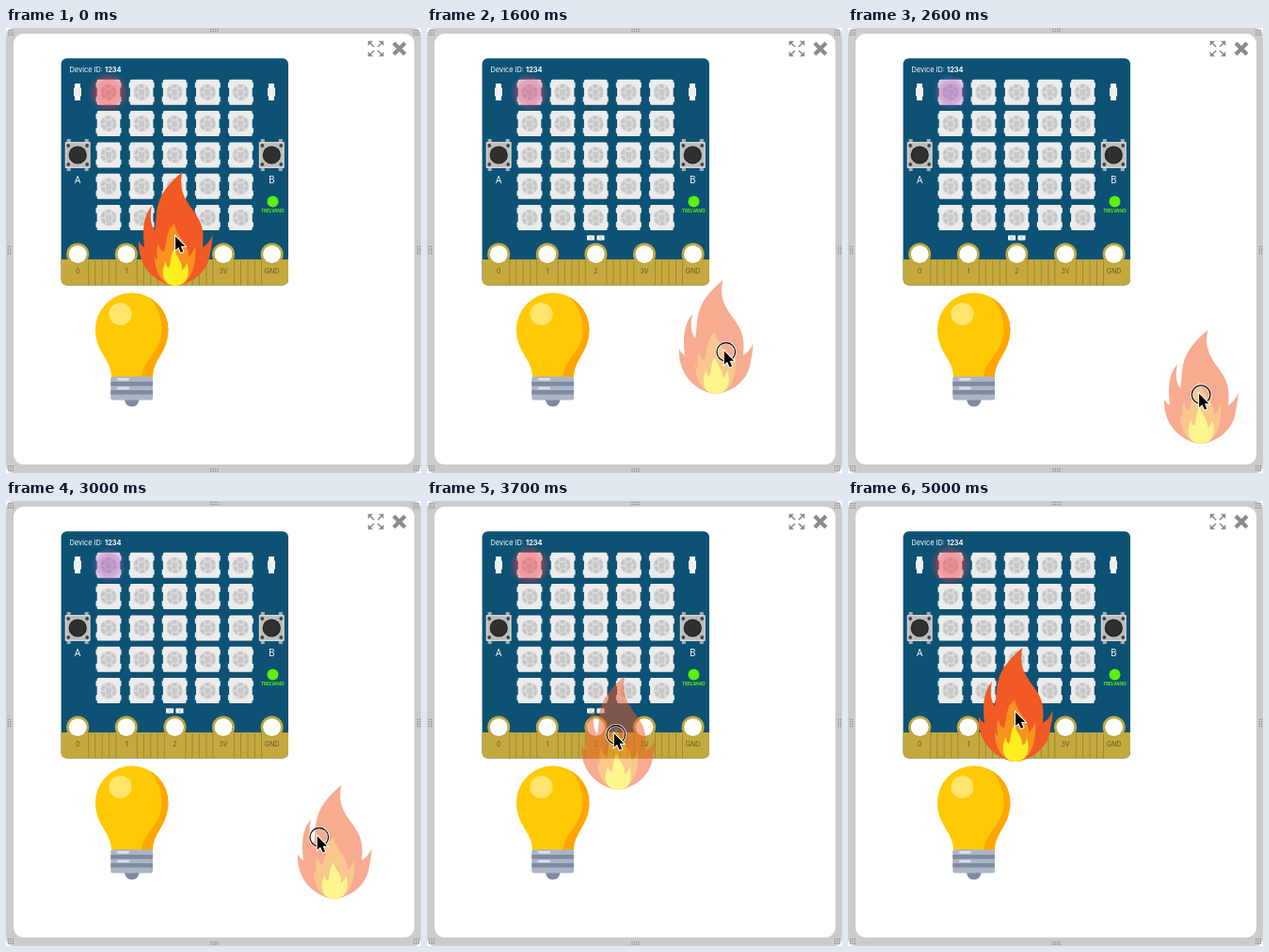
An HTML page with a canvas for the animation above (5500 ms loop, 441 px wide and 473 px high).

```html
<!DOCTYPE html>
<html lang="en">
<head>
<meta charset="utf-8">
<title>Board simulator</title>
<style>
  html, body { margin: 0; width: 100%; height: 100%; overflow: hidden; background: #fff; }
  canvas { display: block; }
</style>
</head>
<body>
<canvas id="stage" width="441" height="473"></canvas>
<script>
const W = 441, H = 473, LOOP = 5500, STEP = 100;
const PRESS = 600, RELEASE = 4800, LAG = 100;
const SANS = '"Open Sans", "Noto Sans", sans-serif', ROUND = 'Inter, Roboto, sans-serif';
const GOLD = '#c4a93e', BOARD = '#0d5274', GREEN = '#5cf00a';

// Pointer drag path: time, x offset, y offset
const PATH = [
  [500, 0, 0], [700, 5, 9], [800, 16, 23], [900, 30, 39], [1000, 44, 51],
  [1500, 127, 115], [1600, 137, 122], [2000, 179, 154], [2100, 187, 161],
  [2400, 195, 168], [2700, 194, 167], [2800, 186, 161], [2900, 169, 149],
  [3000, 152, 135], [3300, 82, 84], [3500, 38, 46], [3600, 23, 33],
  [3700, 20, 26], [4000, 6, 11], [4300, 0, 5], [4600, -2, 3]
];

const stage = document.getElementById('stage').getContext('2d');

function layer(w, h, draw) {
  const c = document.createElement('canvas');
  c.width = w;
  c.height = h;
  draw(c.getContext('2d'));
  return c;
}

function rect(g, x, y, w, h, color, r = 0) {
  g.fillStyle = color;
  g.beginPath();
  g.roundRect(x, y, w, h, r);
  g.fill();
}

function disc(g, x, y, r, color) {
  g.fillStyle = color;
  g.beginPath();
  g.arc(x, y, r, 0, Math.PI * 2);
  g.fill();
}

function shape(g, d, color) {
  g.fillStyle = color;
  g.fill(new Path2D(d));
}

function label(g, text, x, y, font, color, align = 'center') {
  g.font = font;
  g.fillStyle = color;
  g.textAlign = align;
  g.fillText(text, x, y);
}

function drawGrip(g, x, y, cols, rows) {
  for (let i = 0; i < cols; i++)
    for (let j = 0; j < rows; j++)
      rect(g, x + (i - (cols - 1) / 2) * 2.4 - .6, y + (j - (rows - 1) / 2) * 2.4 - .6, 1.2, 1.2, '#888');
}

function drawWindow(g) {
  rect(g, 0, 0, W, H, '#fff');
  rect(g, 0, 0, W, H, '#ccc', 8);
  rect(g, 8, 6, 426, 458, '#fff', 11);
  for (const y of [2.5, 470]) drawGrip(g, 221.5, y, 4, 2);
  for (const x of [3.5, 438.5]) drawGrip(g, x, 236, 2, 4);
  for (const x of [5, 436]) for (const y of [5, 468]) drawGrip(g, x, y, 3, 3);

  g.strokeStyle = g.fillStyle = '#8b8b8b';
  for (const sx of [-1, 1]) for (const sy of [-1, 1]) {
    g.save();
    g.translate(393, 22);
    g.scale(sx, sy);
    g.lineWidth = 1.6;
    g.stroke(new Path2D('M2,2 L7,7'));
    g.fill(new Path2D('M8.3,8.3 H2.8 L4.4,6.8 L6.8,4.4 L8.3,2.8 Z'));
    g.restore();
  }
  g.lineWidth = 4.2;
  g.stroke(new Path2D('M412,16 L424,28 M424,16 L412,28'));
}

function drawLed(g, x, y) {
  g.save();
  g.translate(x, y);
  for (const top of [-10.5, 4.5]) rect(g, -13.5, top, 27, 6, '#ececec', 1);
  rect(g, -12.3, -13.5, 24.6, 27, '#ececec', 1.5);
  disc(g, 0, 0, 9, '#dedede');
  g.strokeStyle = '#c6c6c6';
  g.lineWidth = 3.4;
  g.setLineDash([5, 1.8]);
  g.beginPath();
  g.arc(0, 0, 6.5, 0, Math.PI * 2);
  g.stroke();
  shape(g, 'M-3,-3 H3 V1 L2,4 H-2 L-3,1 Z', '#c9c9c9');
  g.restore();
}

function drawButton(g, x, name) {
  for (const dx of [-11.5, 7.5]) rect(g, x + dx, 118, 4, 34, '#a9adb0');
  rect(g, x - 13.5, 121, 27, 28, '#d2d2d2', 1);
  rect(g, x - 12, 122.5, 24, 25, '#bcbcbc', 1);
  for (const sx of [-10, 10]) for (const sy of [-10, 10])
    disc(g, x + sx, 135 + sy, 1.9, '#444');
  disc(g, x, 135, 9.6, '#222');
  disc(g, x, 135, 8.5, '#303030');
  label(g, name, x, 164.5, '10px ' + SANS, '#fff');
}

function drawBoard(g) {
  g.save();
  g.beginPath();
  g.roundRect(58.6, 32.2, 241.4, 241.2, 6);
  g.clip();
  rect(g, 58, 32, 243, 242, BOARD);
  rect(g, 58, 246, 243, 28, GOLD);
  for (let i = 0; i < 4; i++)
    for (const dx of [11, 18, 25.5, 33, 40])
      rect(g, 76.2 + i * 51.6 + dx, 247, 1, 27, '#a48b2b');
  g.restore();

  ['0', '1', '2', '3V', 'GND'].forEach((name, i) => {
    const x = 76.2 + i * 51.6;
    disc(g, x, 240.5, 12, GOLD);
    disc(g, x, 240.5, 10, '#a8912f');
    disc(g, x, 240.5, 9.5, '#fff');
    label(g, name, x, 261.3, '7px ' + ROUND, '#65581f');
  });

  label(g, 'Device ID:', 67.5, 47, '7.4px ' + ROUND, '#fff', 'left');
  label(g, '1234', 105, 47, 'bold 7.4px ' + ROUND, '#fff', 'left');

  for (let row = 0; row < 5; row++)
    for (let col = 0; col < 5; col++)
      drawLed(g, 109 + col * 35.1, 68.3 + row * 33.3);

  for (const x of [76, 282]) {
    rect(g, x - 3, 59, 6, 18, '#fff');
    rect(g, x - 4, 63.5, 8, 9, '#eceff0');
  }
  for (const x of [170, 180.5]) {
    rect(g, x, 220.5, 8, 5, '#fff');
    rect(g, x + 2.5, 220.5, 3, 5, '#d5dade');
  }
  drawButton(g, 76.2, 'A');
  drawButton(g, 282.3, 'B');

  disc(g, 283.5, 184.5, 6, GREEN);
  label(g, 'TRELVANO', 283.5, 196, 'bold 4.7px ' + SANS, GREEN);
}

function drawBulb(g) {
  const glass = new Path2D('M112,371 C112,352 95,345 95,320.3 A38.7,38.7 0 0 1 172.4,320.3 C172.4,345 156,352 156,371 Z');
  g.fillStyle = '#ffc906';
  g.fill(glass);
  g.save();
  g.clip(glass);
  shape(g, 'M143,279 C158,288 165.5,304 165.5,320 C165.5,345 145,352 144,372 H180 V279 Z', '#ffa700');
  g.restore();
  disc(g, 121.5, 304, 12, '#ffe46d');

  shape(g, 'M126,394 H141.5 C141.5,399 138,402.5 133.7,402.5 C129.5,402.5 126,399 126,394 Z', '#7f8a9f');
  rect(g, 111.3, 370.5, 44.7, 25, '#acb4c6', 2);
  rect(g, 111.3, 376, 44.7, 4.5, '#7f8ba2');
  rect(g, 111.3, 385, 44.7, 4.5, '#7f8ba2');
  for (const y of [372, 381.5]) rect(g, 118, y, 13, 2.8, '#dce1e9', 1.4);
}

function drawFlame(g) {
  g.translate(2, 2);
  shape(g, 'M46.5,0 C38,7 24,19 20,37 C18,45 19,53 17,62 C12,55 12,46 14,36 C4,48 4,63 6,80 C3,78 1,76 0,73 C-1,94 9,109 25,117 C31,120 36,121 41,121 C57,118 74,106 76,86 C77.5,79 78.5,73 78.5,66 C77,72 74,76 68,80 C70,62 67,53 58,41 C49,29 42,18 46.5,0 Z', '#f15a24');
  shape(g, 'M38,55 C29,62 30,74 27,85 C22,83 22,80 21,76 C18,83 20,89 20,94 C18,92 18,91 17,89 C17,107 25,120 39,121 C53,120 62,105 60,78 C59,83 57,87 53,90 C54,76 41,71 38,55 Z', '#f7931e');
  shape(g, 'M38,82 C33,88 35,96 32,102 C29,100 29,98 29,95 C25,102 24,112 30,118 C36,123 45,121 49,117 C53,112 54,104 51,96 C50,101 49,102 46,104 C47,95 40,91 38,82 Z', '#fcee21');
}

const scene = layer(W, H, g => {
  drawWindow(g);
  drawBoard(g);
  drawBulb(g);
});
const flame = layer(84, 126, drawFlame);

function pointAt(t) {
  if (t <= PATH[0][0]) return [0, 0];
  for (let i = 1; i < PATH.length; i++) {
    const [t0, x0, y0] = PATH[i - 1], [t1, x1, y1] = PATH[i];
    if (t <= t1) {
      const k = (t - t0) / (t1 - t0);
      return [x0 + (x1 - x0) * k, y0 + (y1 - y0) * k];
    }
  }
  return PATH[PATH.length - 1].slice(1);
}

// The LED glow turns from red to purple as the flame moves away.
function drawGlow(g, distance) {
  const k = Math.min(1, Math.max(0, (distance - 70) / 150)) ** 2;
  const rgb = [250 - 80 * k, 58 + 25 * k, 68 + 122 * k].map(Math.round).join();
  const r = 22 - 3 * k;
  const fade = g.createRadialGradient(109, 68.5, 0, 109, 68.5, r);
  fade.addColorStop(0, `rgba(${rgb},.46)`);
  fade.addColorStop(.6, `rgba(${rgb},.44)`);
  fade.addColorStop(1, `rgba(${rgb},0)`);
  g.fillStyle = fade;
  g.fillRect(85, 45, 48, 48);
}

function drawPointer(g, x, y, pressed) {
  if (pressed) {
    x += .8;
    y += .8;
    g.beginPath();
    g.arc(x, y, 9.8, 0, Math.PI * 2);
    g.strokeStyle = 'rgba(255,255,255,.75)';
    g.lineWidth = 3;
    g.stroke();
    g.strokeStyle = '#111';
    g.lineWidth = 1.3;
    g.stroke();
    x -= 2;
    y -= 1;
  }
  g.save();
  g.translate(x, y);
  const arrow = new Path2D('M0,0 V14.5 L3.3,11.5 L5.8,17.2 L8.3,16.1 L5.8,10.5 H10.3 Z');
  g.strokeStyle = '#fff';
  g.lineWidth = 2;
  g.stroke(arrow);
  g.fillStyle = '#000';
  g.fill(arrow);
  g.restore();
}

function render(now) {
  const t = Math.floor((now % LOOP) / STEP) * STEP;
  const pressed = t >= PRESS && t < RELEASE;
  const [px, py] = pointAt(t);
  const [fx, fy] = pointAt(t - LAG);

  stage.drawImage(scene, 0, 0);
  drawGlow(stage, Math.hypot(fx, fy));
  stage.globalAlpha = pressed ? .5 : 1;
  stage.drawImage(flame, 139 + Math.round(fx), 151 + Math.round(fy));
  stage.globalAlpha = 1;
  drawPointer(stage, 180 + px, 221.5 + py, pressed);
}

const start = performance.now();
function tick() {
  render(performance.now() - start);
  requestAnimationFrame(tick);
}
tick();
</script>
</body>
</html>
```
